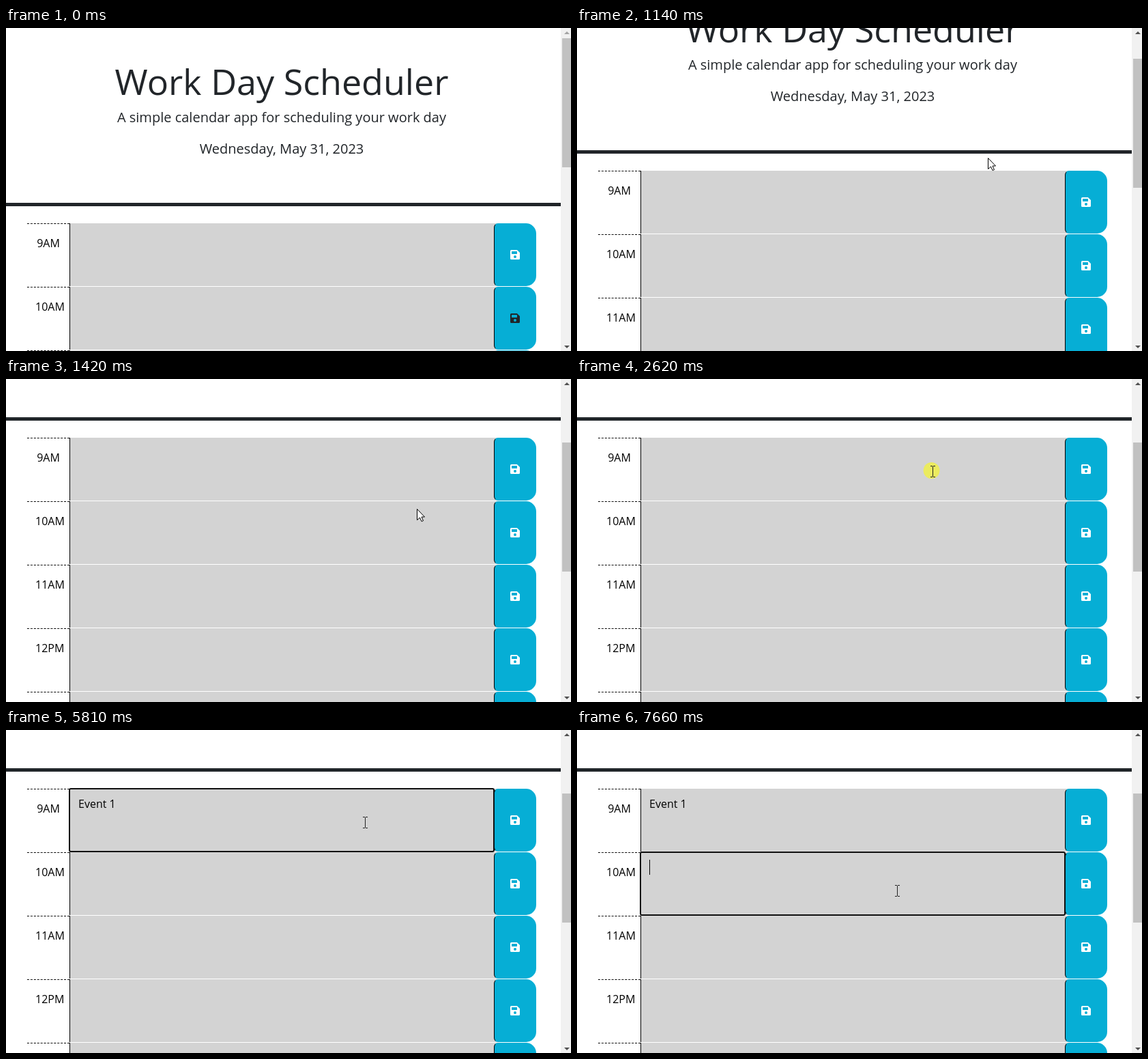
An HTML page that plays this animation: 828 by 473 pixels, repeating every 8000 ms.

```html
<!DOCTYPE html>
<html lang="en">
<head>
<meta charset="utf-8">
<title>Work Day Scheduler</title>
<style>
  html, body { margin: 0; width: 828px; height: 473px; overflow: hidden; background: #fff; }
  body { position: relative; font: 16px/24px "Open Sans", sans-serif; color: #212529; }
  #page { position: absolute; left: 0; top: 0; width: 813px; height: 760px; }
  header { position: absolute; left: 0; top: 0; width: 813px; height: 256px; border-bottom: 5px solid #212529; }
  header > * { position: absolute; left: 0; width: 808px; margin: 0; text-align: center; font-weight: 400; white-space: nowrap; }
  h1 { top: 48px; font-size: 52px; line-height: 60px; }
  p { font-size: 20px; line-height: 30px; }
  .row { position: absolute; left: 31px; width: 746px; height: 92px; color: #000; }
  .hour { position: absolute; left: 0; top: 0; width: 38px; padding: 16px 12px; border-top: 1px dashed #000; text-align: center; white-space: nowrap; }
  .cell { position: absolute; left: 62px; top: 0; width: 615px; height: 82px; padding: 10px 0 0 12px; border-left: 1px solid #000; background: #d3d3d3; white-space: pre; }
  .cell i { position: absolute; top: 11px; width: 1px; height: 22px; margin-left: -.5px; background: #000; visibility: hidden; }
  .ring { position: absolute; z-index: 1; left: 61px; top: -1px; width: 620px; height: 90px; border: 2px solid #101010; border-radius: 3px; visibility: hidden; }
  .save { position: absolute; left: 684px; top: 0; box-sizing: border-box; width: 62px; height: 92px; border: 1px solid transparent; border-left-color: #000; border-radius: 6px 15px 15px 6px; background: #06aed5 border-box; }
  .save svg { position: absolute; left: 23px; top: 38px; width: 14px; height: 14px; overflow: visible; }
  #over { position: absolute; left: 0; top: 0; z-index: 2; }
</style>
</head>
<body>
<div id="page">
  <header>
    <h1>Work Day Scheduler</h1>
    <p style="top:116px">A simple calendar app for scheduling your work day</p>
    <p style="top:162px">Wednesday, May 31, 2023</p>
  </header>
</div>
<svg id="over" width="828" height="473" viewBox="0 0 828 473">
  <rect x="813" width="15" height="473" fill="#f1f1f1"/>
  <rect id="thumb" x="815" y="15" width="13" height="189" fill="#c1c1c1"/>
  <path id="up" d="M818 9h8l-4-4z"/>
  <path d="M818 465h8l-4 4z" fill="#505050"/>
  <circle id="click" r="12" fill="#ff0" fill-opacity=".55"/>
  <g id="cursor">
    <path id="arrow" d="M.5 .5V16.5L4.5 13L7 18.5L9.5 17.5L7 12H11.5Z" fill="#fff" stroke="#000"/>
    <path id="beam" d="M-3-7.5H0M1-7.5H4M.5-7V8M-3 8.5H0M1 8.5H4" fill="none" stroke="#222"/>
    <path id="hand" d="M-2 2Q-2 0 0 0T2 2V8Q4 6.5 5 9Q7 7.5 8 10Q10.5 9 10.5 12V16Q10.5 19 8.5 21V23H-1V21L-5.5 14Q-6.5 11.5-4 11.5L-2 13.5Z" fill="#fff" stroke="#000"/>
  </g>
</svg>
<script>
const LOOP = 8000, TOP = 286, PITCH = 93, ROW_H = 92, BLINK = 530;
const $ = id => document.getElementById(id);
const clamp = v => Math.max(0, Math.min(1, v));
const ease = p => p * p * (3 - 2 * p);
const show = (el, on) => { el.style.visibility = on ? "visible" : "hidden"; };

const DISK = "M1.5 0H9.9L14 4.1V12.5A1.5 1.5 0 0 1 12.5 14H1.5A1.5 1.5 0 0 1 0 12.5V1.5A1.5 1.5 0 0 1 1.5 0Z" +
  "M2.4 2A.4 .4 0 0 0 2 2.4V5.6A.4 .4 0 0 0 2.4 6H9.6A.4 .4 0 0 0 10 5.6V2.4A.4 .4 0 0 0 9.6 2Z" +
  "M7 8A2 2 0 0 0 7 12A2 2 0 0 0 7 8Z";

const rows = ["9AM", "10AM", "11AM", "12PM", "1PM"].map((hour, i) => {
  const el = document.createElement("div");
  el.className = "row";
  el.style.top = TOP + PITCH * i + "px";
  el.innerHTML = `<div class="hour">${hour}</div><div class="cell"><span></span><i></i></div><div class="ring"></div>` +
    `<div class="save"><svg viewBox="0 0 14 14"><path fill-rule="evenodd" d="${DISK}"/></svg></div>`;
  $("page").append(el);
  const q = s => el.querySelector(s);
  return { text: q("span"), caret: q("i"), ring: q(".ring"), save: q(".save"), icon: q("path") };
});

const SCROLL = [0, 30, 77, 128, 173, 194, 200];
const scrollAt = t => SCROLL[Math.max(0, Math.min(6, Math.floor((t - 1000) / 70)))];

// Pointer moves: start time, tick length, tick count, end point, vertical bend
const ENTRY = [756, 462];
const MOVES = [
  { at: 130, tick: 67.5, n: 9, to: [602, 190], bend: 1 },
  { at: 2210, tick: 70, n: 5, to: [521, 135], bend: 1 },
  { at: 5810, tick: 69, n: 11, to: [740, 135], bend: 1 },
  { at: 6970, tick: 69, n: 8, to: [469, 235], bend: 1.55 }
];

function pointerAt(t) {
  let [x, y] = ENTRY;
  MOVES.forEach((m, i) => {
    if (t < m.at) return;
    const k = Math.floor((t - m.at) / m.tick);
    const p = ease(clamp(i ? (k + 1) / m.n : k / (m.n - 1)));
    x += (m.to[0] - x) * p;
    y += (m.to[1] - y) * Math.pow(p, m.bend);
  });
  return [Math.round(x), Math.round(y)];
}

function hit(x, y, scroll) {
  const d = y + scroll - TOP, row = Math.floor(d / PITCH);
  if (d < 0 || row >= rows.length || d - row * PITCH >= ROW_H) return { kind: "arrow" };
  if (x >= 715 && x < 777) return { kind: "hand", row };
  return { kind: x >= 93 && x < 715 ? "beam" : "arrow" };
}

const TEXT = "Event 1";
const KEYS = [3760, 4020, 4220, 4360, 4420, 4550, 4880];
const FOCUS = [[2700, 6570], [7590, LOOP]];
const CLICKS = [[2620, 2760], [6570, 6710], [7520, 7660]];
const within = (t, [a, b]) => t >= a && t < b;

function render(t) {
  const scroll = scrollAt(t);
  $("page").style.top = -scroll + "px";
  $("thumb").setAttribute("y", 15 + Math.round(scroll * .39));
  $("up").setAttribute("fill", scroll ? "#505050" : "#a3a3a3");

  const [x, y] = pointerAt(t);
  const over = t >= 670 && t < 2210 ? { kind: "arrow" } : hit(x, y, scroll);
  show($("cursor"), t >= 130);
  $("cursor").setAttribute("transform", `translate(${x} ${y})`);
  for (const kind of ["arrow", "beam", "hand"])
    $(kind).style.display = kind === over.kind ? "" : "none";

  show($("click"), CLICKS.some(c => within(t, c)));
  $("click").setAttribute("cx", x - 1.5);
  $("click").setAttribute("cy", y - 1);

  const typed = KEYS.filter(k => t >= k).length;
  rows[0].text.textContent = TEXT.slice(0, typed);
  const glow = t < 7590 ? clamp((t - 6540) / 150) : 0;

  rows.forEach((r, i) => {
    const focused = i < 2 && within(t, FOCUS[i]);
    const last = i ? FOCUS[1][0] : typed ? KEYS[typed - 1] : FOCUS[0][0];
    show(r.ring, focused);
    show(r.caret, focused && Math.floor((t - last) / BLINK) % 2 === 0);
    const hot = over.row === i;
    const dy = y + scroll - TOP - PITCH * i - 46;
    const big = hot && Math.abs(x - 746) < 9 && Math.abs(dy) < 9;
    r.icon.setAttribute("fill", hot ? "#212529" : "#fff");
    r.icon.setAttribute("transform", big ? "translate(7 7) scale(1.22) translate(-7 -7)" : "");
    r.save.style.boxShadow = !i && glow ? `0 0 0 ${4 * glow}px rgba(13,110,253,${.25 * glow})` : "none";
  });
}

function loop() {
  render(performance.now() % LOOP);
  requestAnimationFrame(loop);
}
loop();
</script>
</body>
</html>
```
